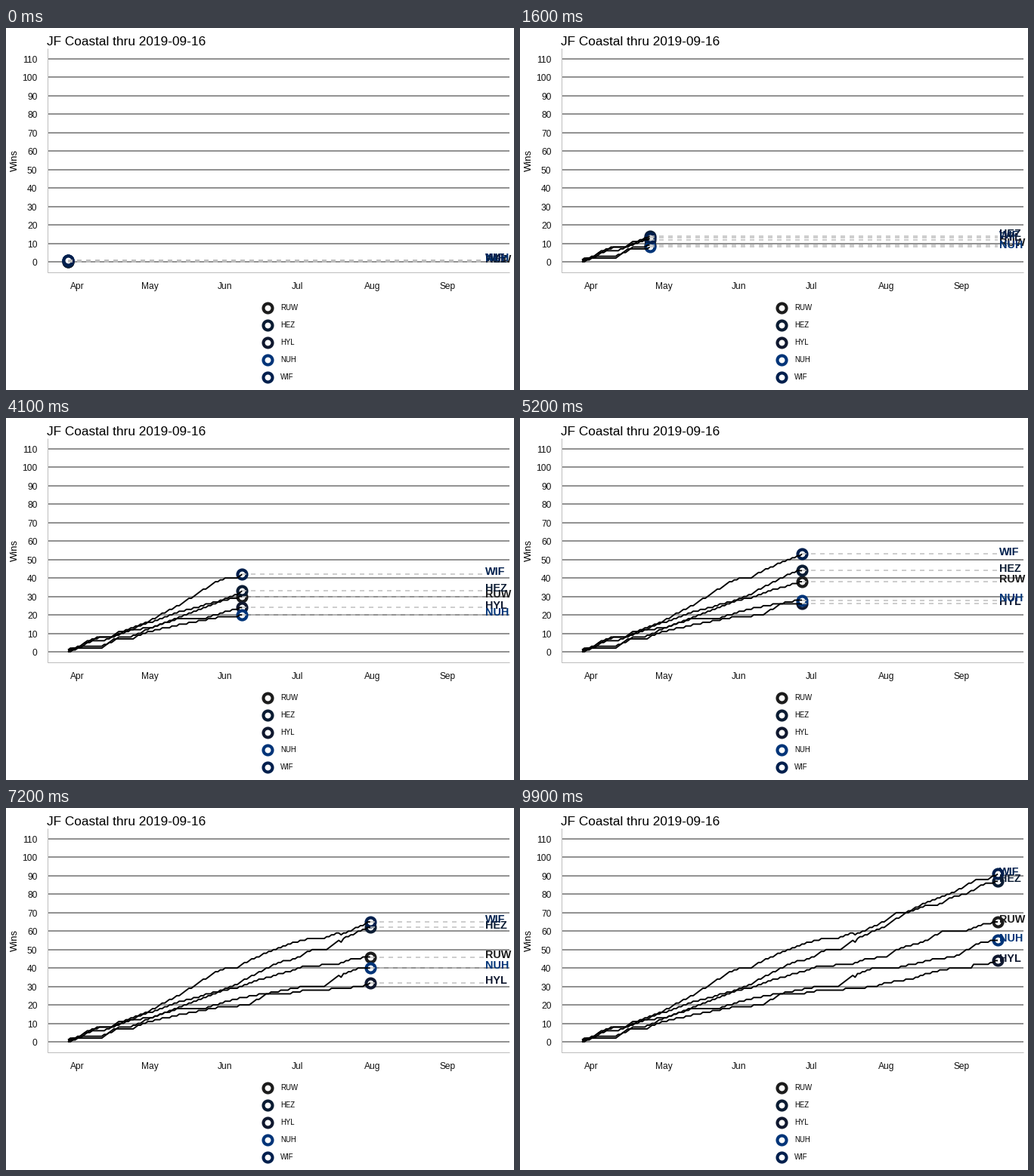
Animation of 672 by 480 pixels, one loop 10000 ms. Source, as a matplotlib script:

```python
import numpy as np
import matplotlib.pyplot as plt
from matplotlib.animation import FuncAnimation
from matplotlib.patches import Rectangle

W, H, DPI = 672, 480, 96
PX = 72 / DPI                       # points per pixel
FRAMES, LAST_DAY = 100, 172         # day 0 is March 28
LEFT, RIGHT, TOP, BOTTOM = 54.5, 666, 27, 323.5
SLIP_DAY = 113                      # win count drops by one for some teams

plt.rcParams["font.family"] = "Liberation Sans"


def px_x(day):
    return 82 + 3.1977 * np.asarray(day)


def px_y(wins):
    return 310 - 2.4455 * np.asarray(wins)


def season(days, wins, slip=False):
    """Whole wins for each day, passing through a few known standings."""
    total = np.floor(np.interp(np.arange(LAST_DAY + 1), days, wins) + 0.5)
    if slip:
        total[SLIP_DAY] = total[SLIP_DAY - 1] - 1
    return total


teams = []


def add_team(name, color, *args, **kw):
    teams.append((name, color, season(*args, **kw)))


add_team("RUW", "#1c1c1c",
         [0, 6, 14, 21, 25, 28, 34, 47, 64, 70, 80, 94, 97, 112, 117,
          126, 130, 143, 149, 159, 167, 172],
         [0, 3, 3, 8, 8, 9, 13, 19, 28, 29, 34, 39, 41, 42, 45,
          46, 50, 55, 60, 60, 64, 65])
add_team("HEZ", "#0b1c33",
         [0, 3, 10, 13, 18, 28, 34, 47, 64, 70, 72, 87, 94, 101, 107, 110,
          112, 126, 134, 143, 147, 154, 159, 167, 170, 172],
         [0, 1, 6, 8, 8, 14, 16, 22, 28, 31, 33, 43, 45, 50, 50, 53,
          55, 63, 70, 74, 74, 79, 80, 86, 86, 87], slip=True)
add_team("HYL", "#10182f",
         [0, 3, 10, 13, 18, 21, 28, 34, 46, 56, 66, 72, 81, 91, 98, 107,
          110, 115, 121, 126, 136, 143, 153, 161, 162, 168, 172],
         [1, 2, 7, 8, 8, 11, 12, 13, 18, 18, 22, 24, 26, 26, 28, 28,
          29, 29, 30, 32, 34, 37, 40, 40, 42, 42, 44])
add_team("NUH", "#003478",
         [0, 2, 14, 20, 27, 28, 34, 47, 64, 70, 72, 75, 82, 94, 98, 106,
          110, 112, 121, 130, 143, 147, 154, 165, 172],
         [1, 2, 2, 7, 7, 8, 11, 15, 19, 19, 20, 20, 26, 29, 30, 30,
          34, 36, 40, 40, 44, 45, 46, 54, 55], slip=True)
add_team("WIF", "#001f4d",
         [0, 2, 9, 15, 28, 47, 60, 66, 70, 72, 80, 91, 100, 106, 110, 112,
          115, 126, 130, 134, 143, 154, 163, 168, 172],
         [1, 1, 6, 6, 13, 26, 37, 40, 40, 42, 47, 53, 56, 56, 58, 59,
          59, 66, 70, 70, 76, 81, 88, 88, 91], slip=True)

fig = plt.figure(figsize=(W / DPI, H / DPI), dpi=DPI, facecolor="white")
ax = fig.add_axes([0, 0, 1, 1])
ax.set(xlim=(0, W), ylim=(H, 0))
ax.axis("off")

panel = Rectangle((LEFT, TOP), RIGHT - LEFT, BOTTOM - TOP, fc="none", ec="none")
ax.add_patch(panel)


def label(x, y, s, size, **kw):
    kw.setdefault("va", "baseline")
    return ax.text(x, y, s, fontsize=size * PX, **kw)


def stroke(x, y, color, width, z, **kw):
    return ax.plot(x, y, color=color, lw=width * PX, zorder=z, **kw)[0]


def ring(x, y, color):
    return ax.plot([x], [y], "o", ms=12 * PX, mew=4.1 * PX,
                   mfc="white", mec=color, zorder=3)[0]


# Static chart furniture
for wins in range(0, 111, 10):
    y = px_y(wins)
    stroke([LEFT, RIGHT], [y, y], "#929292", 2, 1, solid_capstyle="butt")
    label(41.5, y + 5, str(wins), 12, ha="right", color="#111111")
stroke([LEFT, LEFT, RIGHT], [TOP, BOTTOM, BOTTOM], "#bebebe", 1, 1,
       solid_capstyle="butt")
months = zip(["Apr", "May", "Jun", "Jul", "Aug", "Sep"],
             [4, 34, 65, 95, 126, 157])
for name, day in months:
    label(px_x(day), 346, name, 12, ha="center", color="#111111")
label(54, 23, "JF Coastal thru 2019-09-16", 17.3)
label(11.5, 176, "Wins", 13, rotation=90, ha="center", va="center")
for i, (name, color, _) in enumerate(teams):
    y = 370.5 + 23 * i
    ring(345.5, y, color)
    label(363, y + 3.7, name, 9.6)

# Moving parts, one set per team
parts = []
for name, color, _ in teams:
    tag = label(634, 0, name, 14.4, weight="bold", color=color, zorder=6)
    tag.set_clip_path(panel)
    parts.append((
        ring(0, 0, color),
        stroke([], [], "#bebebe", 1.5, 4, linestyle=(0, (4, 4))),
        stroke([], [], "black", 1.9, 5, solid_capstyle="butt"),
        tag,
    ))


def draw(frame):
    day = int((frame + 0.5) * LAST_DAY / (FRAMES - 1))
    x = px_x(np.arange(day + 1))
    for (_, _, wins), (dot, guide, trail, tag) in zip(teams, parts):
        y = px_y(wins[:day + 1])
        dot.set_data([x[-1]], [y[-1]])
        guide.set_data([x[-1], px_x(LAST_DAY)], [y[-1], y[-1]])
        trail.set_data(x, y)
        tag.set_y(y[-1] + 1.2)
    return [p for group in parts for p in group]


anim = FuncAnimation(fig, draw, frames=FRAMES, interval=100,
                     repeat=True, repeat_delay=0)
plt.show()
```
